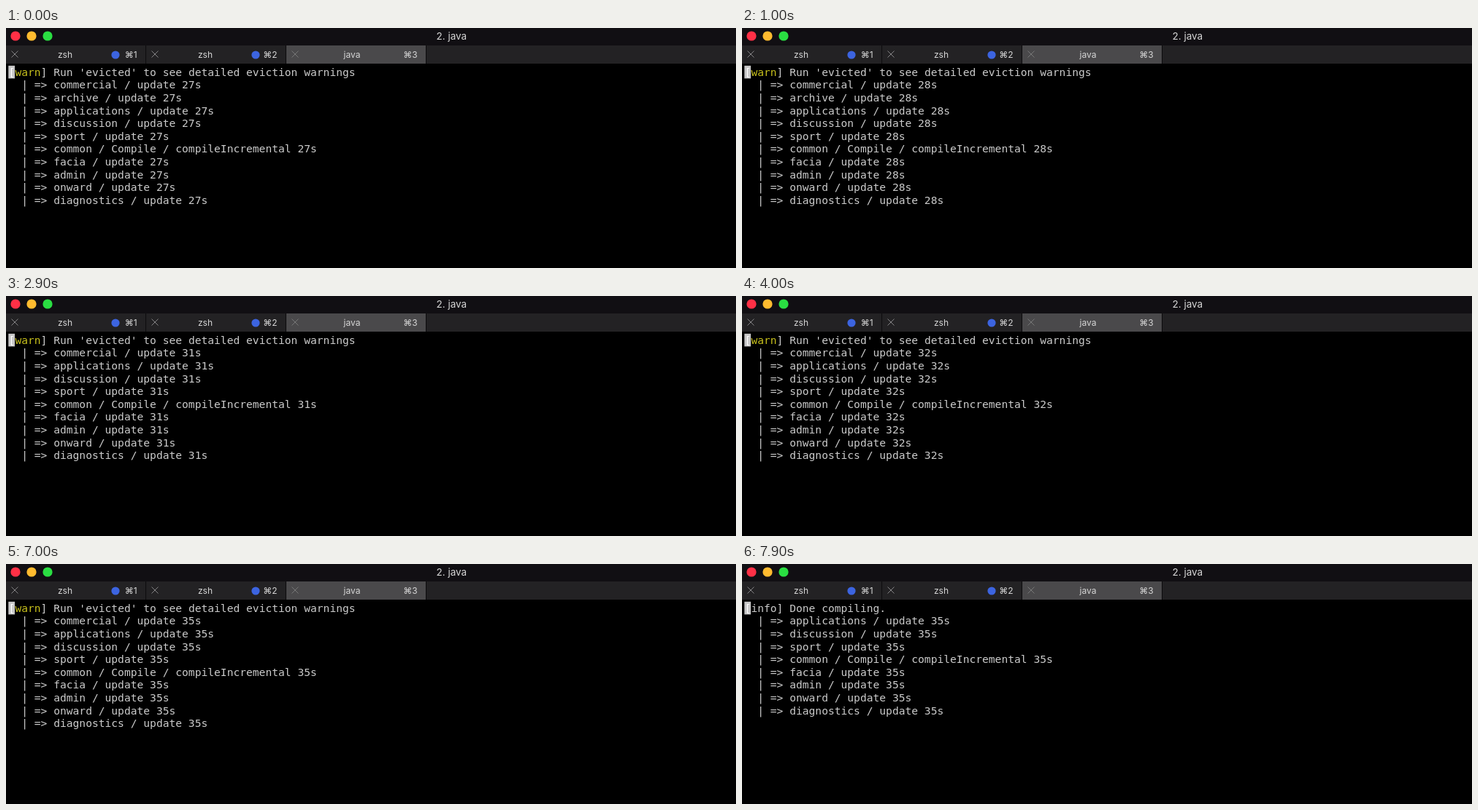
An HTML page for the animation above (8 s loop, 1000 px wide and 330 px high).

```html
<!DOCTYPE html>
<html lang="en">
<head>
<meta charset="utf-8">
<title>Terminal build</title>
<style>
  html, body { margin: 0; width: 100%; height: 100%; overflow: hidden; background: #000; }
  svg { display: block; }
  text { white-space: pre; }
  .ui { font: 12px Inter, "DejaVu Sans", sans-serif; fill: #d6d6d6; }
  .mono { font: 14.62px "DejaVu Sans Mono", monospace; fill: #cbcbcb; }
</style>
</head>
<body>
<svg width="1000" height="330" viewBox="0 0 1000 330">
  <rect width="1000" height="24" fill="#110f13"/>
  <circle cx="13" cy="11" r="6.6" fill="#ff3046"/>
  <circle cx="35" cy="11" r="6.6" fill="#ffbb2f"/>
  <circle cx="57" cy="11" r="6.6" fill="#2ade42"/>
  <text class="ui" x="589.5" y="16" style="font-size:13.5px">2. java</text>
  <rect y="24" width="1000" height="25" fill="#232224"/>
  <g id="tabs"></g>
  <rect x="3.3" y="51.8" width="8.8" height="17.6" fill="#c7c7c7"/>
  <g id="screen"></g>
</svg>
<script>
const LOOP = 8000, LEFT = 3.6, FIRST_LINE = 65.8, LINE_HEIGHT = 17.6;
const tasks = ['commercial', 'archive', 'applications', 'discussion', 'sport',
  'common', 'facia', 'admin', 'onward', 'diagnostics'];
const ticks = [400, 1400, 2000, 2900, 4000, 5000, 6000, 7000];
const screen = document.getElementById('screen');

document.getElementById('tabs').innerHTML = ['zsh', 'zsh', 'java'].map((name, i) => {
  const active = i === 2;
  return `<g transform="translate(${i * 192})">
    ${active ? '<rect y="24" width="192" height="25" fill="#4a494b"/>' : ''}
    <path d="M7.5 31.5l9 9m0-9l-9 9" stroke="${active ? '#777' : '#858486'}" fill="none"/>
    <text class="ui" x="${active ? 90 : 81}" y="41" text-anchor="middle">${name}</text>
    ${active ? '' : '<circle cx="150" cy="37" r="5.6" fill="#3c64e0"/>'}
    <text class="ui" x="179.7" y="41" text-anchor="end">⌘${i + 1}</text>
    <path d="M191.5 24v25" stroke="#0c0b0d"/>
  </g>`;
}).join('');

function visibleTasks(t) {
  if (t >= 7400 || (t >= 700 && t < 800)) return tasks.slice(2);
  return t < 1400 ? tasks : tasks.filter(name => name !== 'archive');
}

function taskLine(name, t) {
  const compiling = name === 'common';
  let seconds = 27 + ticks.filter(tick => t >= tick).length;
  // The compile counter reaches 30 s later than the others.
  if (compiling && t >= 2000 && t < 2500) seconds--;
  const step = compiling ? 'Compile / compileIncremental' : 'update';
  return `  | =&gt; ${name} / ${step} ${seconds}s`;
}

function header(t) {
  const [level, color, message] = t < 7400
    ? ['warn', '#c7c01c', "Run 'evicted' to see detailed eviction warnings"]
    : ['info', '#cbcbcb', 'Done compiling.'];
  return `<tspan fill="#fff">[</tspan><tspan fill="${color}">${level}</tspan>] ${message}`;
}

let shown = '';
function draw(now) {
  const t = now % LOOP;
  const lines = [header(t), ...visibleTasks(t).map(name => taskLine(name, t))];
  const markup = lines.map((line, i) =>
    `<text class="mono" x="${LEFT}" y="${FIRST_LINE + i * LINE_HEIGHT}">${line}</text>`).join('');
  if (markup !== shown) screen.innerHTML = shown = markup;
  requestAnimationFrame(draw);
}
draw(performance.now());
</script>
</body>
</html>
```
